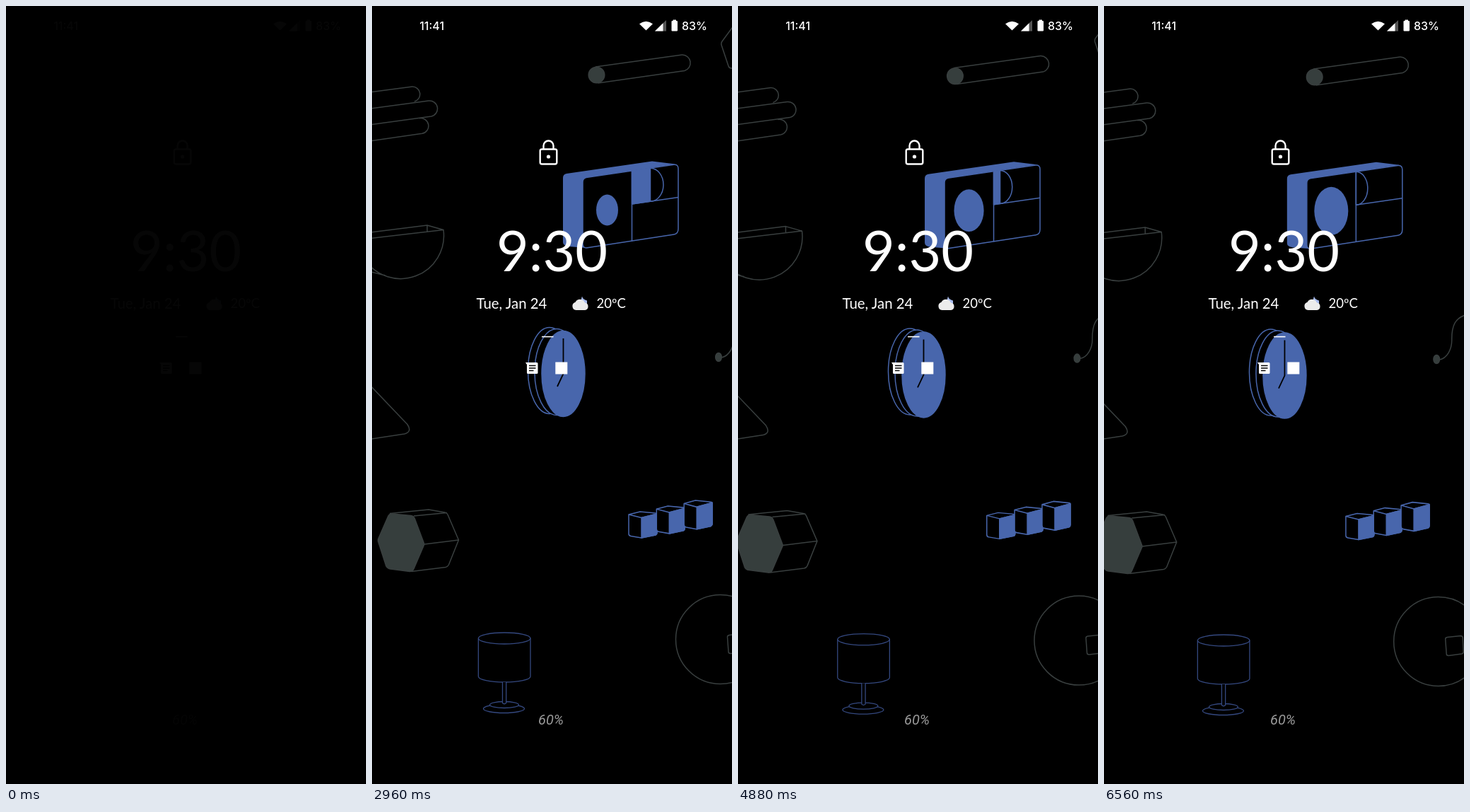
An HTML page that plays this animation: 509 px wide and 1100 px high, repeating every 6640 ms.

```html
<!DOCTYPE html>
<html lang="en">
<head>
<meta charset="utf-8">
<title>Lock screen</title>
<style>
  html, body { margin: 0; width: 100%; height: 100%; overflow: hidden; background: #000; }
  svg { display: block; }
  .line { fill: none; stroke-width: 1.5; stroke-linejoin: round; }
  .grey { stroke: #393f3f; }
  .blue { stroke: #4866ac; }
  .dim { stroke: #34487f; stroke-width: 1.3; }
  .solid { fill: #363e3d; }
  .tint { fill: #4866ac; }
  .black { fill: #000; }
  text { fill: #fff; font-family: Lato, sans-serif; }
  .status { font: 500 16px Inter, sans-serif; }
</style>
</head>
<body>
<svg width="509" height="1100" viewBox="0 0 509 1100">
  <g id="wallpaper">
    <!-- corner polygon -->
    <g class="line grey" data-shift="-23 -10">
      <path d="M515 23 495 50Q493.500 52 494 55L504 85Q505 88 508 88H540"/>
    </g>

    <g class="line grey" data-shift="23 3.5">
      <!-- capsule -->
      <path d="M316 86 438.5 69A11.5 11.5 0 0 1 442 91.5L319.5 109"/>
      <circle class="solid" cx="317.5" cy="97.5" r="11.3"/>
      <!-- stacked bars -->
      <path d="M-10 122.9 57 114A10.7 10.7 0 0 1 60 135"/>
      <path d="M-10 146 80 134A11.2 11.2 0 0 1 84 156L-10 168.8"/>
      <path d="M67 158.8A10.8 10.8 0 0 1 71 180.3L-10 192"/>
      <!-- bowl -->
      <path d="M-10 321 78 310 101 316.5-10 329.5M78 310V319M101 316.5A61 61 0 0 1 -10 358.7M-8 374Q5 378 19 381"/>
      <!-- triangle -->
      <path d="M-10 528.6 50 591.5Q57 602 46 605L-10 613.5"/>
      <!-- hexagonal prism -->
      <path class="solid" d="M9 758Q8 756 9 753L23 721Q25 717.5 29 718L55 720.5Q59 721 60.5 725L74 761 59 796Q57 800 53 799.5L26 796Q22 795.5 20 792Z"/>
      <path d="M25 717.5 80 712 103 716Q106 716.5 107 719L122.5 755 108.5 790Q107 793 104 793.5L56 799.5M59 721 106 716.5M74 761 122.5 755"/>
      <!-- disc -->
      <circle cx="492.5" cy="895.5" r="63"/>
      <path d="M505 889.5 524 887.5Q526.5 887.5 527 890L528 910Q528 912.5 525.5 913L507 915.5Q504 915.5 504 913L502.5 892Q502.5 890 505 889.5Z"/>
      <!-- corded mouse -->
      <ellipse class="solid" cx="490" cy="496.5" rx="4.3" ry="6"/>
      <path d="M494 497C505 495 512 482 511.5 468C511.5 448 517 439 529 434.5L540 433"/>
    </g>

    <!-- camera -->
    <g class="line blue" data-shift="13 1.5">
      <path class="tint" stroke="none" d="M270 243Q270 238 275 237L396 219.5 429 223.5 303 242.5Q298 243.5 298 249V336Q298 341 303 342L278 340Q270 339 270 334Z"/>
      <path class="black" d="M303 242.5 427 224.3Q433 224 433 230V315Q433 322 427 323L303 342Q298 342 298 336V249Q298 243.5 303 242.5Z"/>
      <path d="M367.5 233V332.5M367.5 280 433 270.5"/>
      <path id="flash" class="tint"/>
      <path id="dome"/>
      <ellipse id="lens" class="tint" stroke="none" cx="332.5" cy="288.5"/>
    </g>

    <!-- clock -->
    <g class="line blue" data-shift="17.5 3">
      <ellipse cx="251" cy="515.5" rx="30.5" ry="61"/>
      <ellipse class="black" cx="261" cy="517.5" rx="31" ry="61"/>
      <ellipse class="tint" cx="270.5" cy="520" rx="30.5" ry="60.5"/>
      <path stroke="#000" stroke-width="1.8" d="M262 538 270.5 520V470"/>
    </g>

    <!-- cubes -->
    <g class="line blue" data-shift="24.5 3">
      <g id="cube">
        <path class="black" d="M363 719 379 715 401 717Q403 717 403 719V745Q403 747 401 748L381 752 366 749.5Q363 749 363 746Z"/>
        <path d="M363 719 381 723.5 403 718"/>
        <path class="tint" d="M381 723.5 403 718V745Q403 747 401 748L381 752Z"/>
      </g>
      <use href="#cube" transform="translate(39.3 706.5) scale(1 1.05) translate(0 -714.5)"/>
      <use href="#cube" transform="translate(78.2 698.5) scale(1 1.1) translate(0 -714.5)"/>
    </g>

    <!-- lamp -->
    <g class="line dim" data-shift="21 3.5">
      <ellipse cx="187.2" cy="894" rx="36.8" ry="8"/>
      <path d="M150.4 894V948A36.8 8 0 0 0 224 948V894"/>
      <ellipse cx="186.5" cy="993.5" rx="29" ry="6"/>
      <ellipse class="black" cx="187" cy="988" rx="20.5" ry="4.5"/>
      <path class="black" d="M184.5 956V985.5Q187 988 189.7 985.5V956"/>
    </g>
  </g>

  <g id="overlay" fill="#fff">
    <text class="status" x="67.2" y="33.5">11:41</text>
    <text class="status" x="438" y="33.5">83%</text>
    <path d="M378 25.3Q387.5 18 397 25.3L387.5 34.5Z"/>
    <path fill="#555" d="M400 35.5 416 20V35.5Z"/>
    <path d="M400 35.5 411.5 24.3V35.5Z"/>
    <path d="M425.5 21V19.5H430V21H431Q432 21 432 22V34.5Q432 35.5 431 35.5H424.5Q423.5 35.5 423.5 34.5V22Q423.5 21 424.5 21Z"/>

    <g fill="none" stroke="#fff" stroke-width="2.4">
      <rect x="237.7" y="202.5" width="23.6" height="21" rx="2.5"/>
      <path d="M242.5 202V197.5A7 7 0 0 1 256.5 197.5V202"/>
    </g>
    <circle cx="249.5" cy="213" r="2.6"/>

    <text x="254.5" y="375" font-size="79" text-anchor="middle">9:30</text>
    <text x="147.5" y="428" font-size="20.4">Tue, Jan 24</text>
    <text x="317.5" y="427" font-size="18.5">20ºC</text>

    <path fill="#a9bdf0" d="M297 410.5Q298 415 304 416.5L304 421H294Z"/>
    <path fill="#ececec" d="M288.5 430A5.8 5.8 0 0 1 287.5 418.7A7.5 7.5 0 0 1 301 419.5A5.3 5.3 0 0 1 301 430Z"/>

    <rect x="240" y="466.8" width="16.5" height="1.6"/>
    <path d="M217 504H233Q234.5 504 234.5 505.5V518.5Q234.5 520 233 520H220.5Q219 520 219 518.5V507Z"/>
    <path stroke="#000" stroke-width="1.5" d="M222 508.5H231.5M222 512H231.5M222 515.5H228.5"/>
    <rect x="259.3" y="503.5" width="17" height="17"/>
    <text x="253" y="1016" text-anchor="middle" style="font: italic 20px Roboto, sans-serif; fill: #999">60%</text>
  </g>
</svg>
<script>
  const LOOP = 6640, STEP = 80, WAKE = 2080, CRUISE = 2960;
  const find = id => document.getElementById(id);
  const layers = [...document.querySelectorAll('[data-shift]')].map(el => ({
    el, shift: el.dataset.shift.split(' ').map(Number)
  }));

  // Drift gains speed after waking, then stays linear.
  function drift(time) {
    const s = (Math.max(time, WAKE) - CRUISE) / 1000;
    return 0.239 * s + (s < 0 ? 0.091 * s * s : 0);
  }

  function drawCamera(time) {
    const open = time < 3060 ? 1 : Math.cos(Math.PI * (time - 3060) / 1400) ** 2;
    const left = 367.5, width = 26 * open, x = left + width;
    const top = 233 - width * 0.145, bottom = 280 - width * 0.145;
    find('flash').setAttribute('d', `M${left} 233L${x} ${top}V${bottom}L${left} 280Z`);
    find('dome').setAttribute('d', `M${x} ${top}A${16.5 + 2 * open} 23.5 0 0 1 ${x} ${bottom}`);
    find('lens').setAttribute('rx', 24 - 8.5 * open);
    find('lens').setAttribute('ry', 34 - 12 * open);
  }

  function draw(time) {
    const awake = time >= WAKE;
    const fade = awake ? Math.min(1, 0.15 + (time - WAKE) / 570) : 0.022;
    find('overlay').setAttribute('opacity', fade);
    find('wallpaper').setAttribute('opacity', awake ? fade : 0);
    const d = drift(time);
    for (const { el, shift: [dx, dy] } of layers)
      el.setAttribute('transform', `translate(${-dx * d} ${dy * d})`);
    drawCamera(time);
  }

  const start = performance.now();
  function tick() {
    const time = (performance.now() - start) % LOOP;
    draw(Math.floor(time / STEP) * STEP);
    requestAnimationFrame(tick);
  }
  tick();
</script>
</body>
</html>
```
